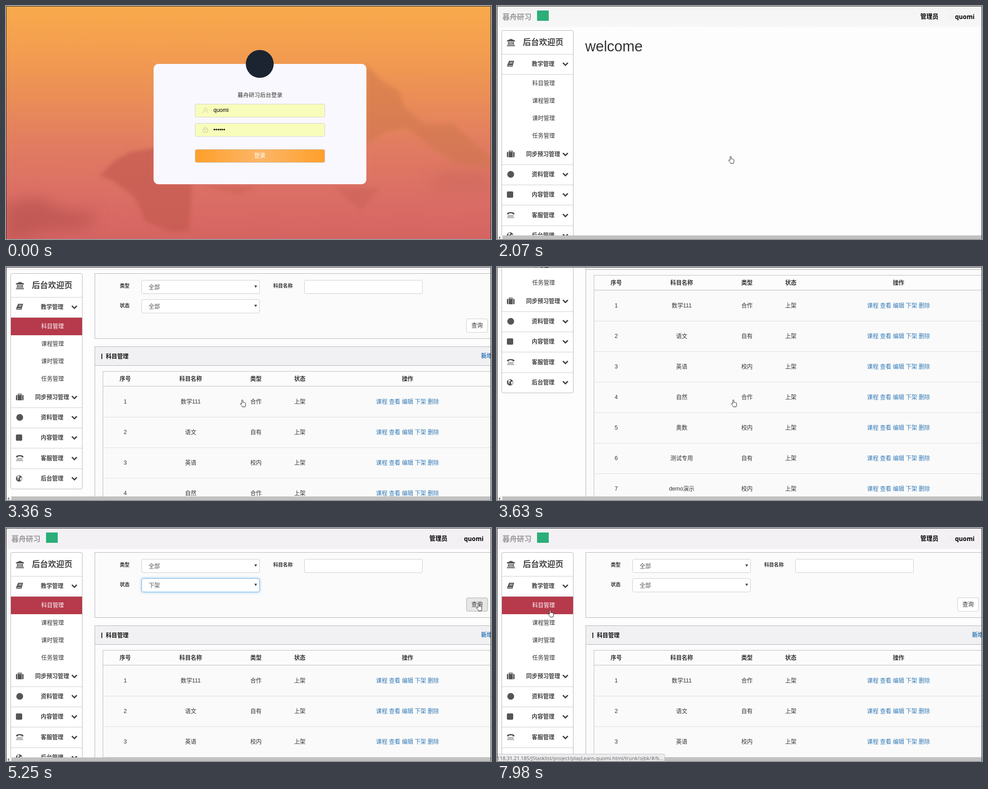
Animation, 1078 px wide and 519 px high, one loop 8000 ms. Source, as an HTML page:

```html
<!DOCTYPE html>
<html lang="zh-CN">
<head>
<meta charset="utf-8">
<title>后台管理</title>
<style>
  html, body { margin: 0; width: 100%; height: 100%; overflow: hidden; background: #fff; }
  body { font-family: "Liberation Sans", "Noto Sans CJK SC", "Noto Sans CJK", sans-serif; color: #333; }
  div, svg { position: absolute; box-sizing: border-box; }
  svg { overflow: visible; }
  #stage { left: 0; top: 0; width: 1078px; height: 519px; overflow: hidden; background: #fdfdfd; }
  .full { left: 0; top: 0; width: 1078px; height: 519px; overflow: hidden; }
  .text { white-space: pre; line-height: 20px; height: 20px; }
  .mid { transform: translateX(-50%); }
  .bold { font-weight: 700; }
  .link { color: #337ab7; }
  .field { border: 1px solid #ccc; border-radius: 4px; background: #fff; }
  .login-field { border: 1px solid #d2d2cf; border-radius: 4px; background: #f9fdbb; }
  .panel { border: 1px solid #b4b4b4; background: #fbfbfb; }
  .focus { border-color: #66afe9; box-shadow: 0 0 6px rgba(102, 175, 233, .6); }
  .submit { border: 1px solid #c9c2b8; border-radius: 4px;
            background: linear-gradient(90deg, #ff9f2a, #fbb668 50%, #ff9f2a); }
  .submit.hover { background: linear-gradient(90deg, #ff9f2a, #f1ad5c 50%, #ff9f2a); }
  .submit.pressed { border: 2px solid #6a9fe6; border-radius: 2px; }
  .query.hover { background: #e6e6e6; border-color: #adadad; }
  .sub { background: #fff; color: #333; }
  .sub.on { background: #b63a4b; color: #fff; }
  .option { background: #fff; color: #555; }
  .option.on { background: #1e90ff; color: #fff; }
</style>
</head>
<body>
<div id="stage"></div>
<script>
const LOOP = 8000;
const BRAND = "暮舟研习", USER = "quomi";
const stage = document.getElementById("stage");

function box(parent, x, y, w, h, css = "", cls = "") {
  const el = document.createElement("div");
  el.className = cls;
  el.style.cssText = `left:${x}px;top:${y}px;width:${w}px;height:${h}px;${css}`;
  return parent.appendChild(el);
}

// y is the vertical middle of the line
function text(parent, str, x, y, size = 12.6, cls = "", css = "") {
  const el = document.createElement("div");
  el.className = "text " + cls;
  el.textContent = str;
  el.style.cssText = `left:${x}px;top:${y - 10}px;font-size:${size}px;${css}`;
  return parent.appendChild(el);
}

function svg(parent, x, y, w, h, body, css = "") {
  parent.insertAdjacentHTML("beforeend",
    `<svg width="${w}" height="${h}" style="left:${x}px;top:${y}px;${css}">${body}</svg>`);
  return parent.lastElementChild;
}

function layer(parent) {
  return box(parent, 0, 0, 1078, 519, "", "full");
}

const person = c => `<g fill="none" stroke="${c}"><circle cx="6.5" cy="4" r="3.3"/>
  <path d="M.5 12.5Q1.5 8 5 7.2M8 7.2Q11.5 8 12.5 12.5"/></g>`;

// Application page
const view = box(stage, 0, 0, 1078, 511, "overflow:hidden");
const app = box(view, 0, 0, 1078, 1200);
const header = box(app, 0, 0, 1078, 47);
text(app, BRAND, 12, 24, 16.2, "bold", "color:#999");
box(app, 89, 10, 26, 23, "background:#2bae78");
text(app, "管理员", 941, 24, 13.4, "bold", "color:#000");
svg(app, 1004, 18, 13, 13, person("#ebe8eb"));
text(app, USER, 1018, 24, 13.6, "bold", 'color:#000;font-family:"Noto Sans",sans-serif');

const icons = [
  '<path d="M0 4L9 0L18 4V6H0zM2.5 7h2.5v5H2.5zM6 7h2.2v5H6zM9.8 7H12v5H9.8zM13 7h2.5v5H13zM1 12.8h16v1.4H1zM0 15h18v1.6H0z"/>',
  '<path d="M5 1H16L12.5 14H2Q-.5 13 1 10z"/><path d="M6.5 4h6.5M5.8 6.5h6.5M2.5 11.5h9" stroke="#fff"/>',
  '<path d="M5 3V1h7v2" fill="none" stroke="#555" stroke-width="1.6"/><rect y="3" width="17" height="12" rx="2"/><path d="M3.5 3v12M13.5 3v12" stroke="#fff"/>',
  '<circle cx="8.5" cy="8" r="7.6"/>',
  '<rect x="0" y="1" width="14" height="14" rx="2.5"/>',
  '<path d="M0 6Q0 1 8.5 1T17 6H12.5V4.2Q8.5 3.2 4.5 4.2V6z"/><path d="M3 8.5h11.5M2 11h13M1 13.5h15" stroke="#555" stroke-width="1.7" stroke-dasharray="2 1.2"/>',
  '<circle cx="7" cy="8" r="7"/><path d="M3 3l4-1 1 3-3 2 1 3-2 1zM9 7l4-1 0 4-3 3z" fill="#fff"/>'
];
const side = box(app, 10, 54, 160, 481,
  "border:1px solid #b4b4b4;border-radius:4px;background:#fff;overflow:hidden");
const menu = [
  ["后台欢迎页", 81, 107], ["教学管理", 129, 152], ["同步预习管理", 330, 353], ["资料管理", 375, 398],
  ["内容管理", 420, 443], ["客服管理", 466, 489], ["后台管理", 511, 0]
];
menu.forEach(([name, y, line], i) => {
  svg(app, 22, y - 8, 18, 17, icons[i], "fill:#555");
  text(app, name, 102.5, y, i ? 12.6 : 18, "bold mid", "color:#444");
  if (i) svg(app, 145, y - 4, 14, 9,
    '<path d="M1.5 1.5L7 7L12.5 1.5" fill="none" stroke="#444" stroke-width="3"/>');
  if (line) box(app, 11, line, 158, 1, "background:#ccc");
});
const subs = ["科目管理", "课程管理", "课时管理", "任务管理"].map((name, i) => {
  const el = box(app, 11, 153 + 39 * i, 158, 39, "", "sub");
  text(el, name, 92.5, 18.5, 12.6, "mid");
  return el;
});

const welcome = layer(app);
welcome.style.left = "171px";
text(welcome, "welcome", 25, 90, 32.4);

// Subject page
const subject = box(app, 0, 0, 1100, 1200);
box(subject, 197, 54, 960, 146, "", "panel");
const label = (s, x, y) => text(subject, s, x, y, 10.8, "bold");
label("类型", 253, 82);
label("科目名称", 594, 82);
label("状态", 253, 126);

function select(y) {
  const el = box(subject, 301, y, 263, 31, "", "field");
  svg(el, 250, 11, 6, 6, '<path d="M0 0H6L3 5.5z" fill="#444"/>');
  const value = text(el, "全部", 15, 15, 12.6, "", "color:#555");
  return { el, value };
}
select(68.5);
const status = select(112);
box(subject, 663, 68.5, 263, 31, "", "field");
const query = box(subject, 1023, 155, 48, 31, "", "field query");
text(query, "查询", 23, 14, 12.6, "mid");

const listPanel = box(subject, 197, 217, 960, 900, "", "panel");
box(listPanel, 0, 0, 960, 42, "background:#f1f0f2;border-bottom:1px solid #b4b4b4");
box(subject, 212, 233, 2, 12, "background:#222");
text(subject, "科目管理", 222, 239, 12.6, "bold", "color:#111");
text(subject, "新增", 1056, 238, 12.6, "bold link");

function table(cols, rows, move) {
  const el = box(subject, 0, 0, 1100, 1200);
  box(el, 215, 272, 940, 35 + 68 * rows.length, "border:1px solid #bbb;background:#fafafa");
  box(el, 215, 272, 940, 34, "border:1px solid #bbb;background:#fcfcfc");
  ["序号", "科目名称", "类型", "状态", "操作"].forEach((s, i) => text(el, s, cols[i], 289, 12.6, "bold mid"));
  rows.forEach(([name, kind], r) => {
    const y = 340 + 68 * r;
    if (r) box(el, 216, y - 34, 938, 1, "background:#ddd");
    [r + 1, name, kind, move === "下架" ? "上架" : "下架"]
      .forEach((s, i) => text(el, s, cols[i], y, 12.6, "mid"));
    text(el, `课程 查看 编辑 ${move} 删除`, cols[4], y, 12.6, "mid link");
  });
  return el;
}
const fullTable = table([265, 410.5, 555.5, 653, 892.5], [
  ["数学111", "合作"], ["语文", "自有"], ["英语", "校内"], ["自然", "合作"],
  ["奥数", "校内"], ["测试专用", "自有"], ["demo演示", "校内"], ["科学", "自有"]
], "下架");
const foundTable = table([266.5, 405.5, 544, 643.5, 888], [["111111111", "校内"]], "上架");
box(foundTable, 804, 410, 267, 31, "border:1px solid #ddd;border-radius:4px;background:#fff");
[["第一页", 804, 59], ["上一页", 863, 59], ["1", 922, 30], ["下一页", 952, 59], ["最后页", 1011, 60]]
  .forEach(([s, x, w], i) => {
    const here = i === 2;
    if (i) box(foundTable, x, 410, 1, 31, "background:#ddd");
    if (here) box(foundTable, x, 410, w, 31, "background:#337ab7");
    text(foundTable, s, x + w / 2, 425, 12.6, "mid", `color:${here ? "#fff" : "#777"}`);
  });

const dropdown = box(subject, 301, 142, 263, 50, "border:1px solid #8ab;background:#fff");
const options = ["全部", "上架", "下架"].map((s, i) => {
  const el = box(dropdown, 0, 16 * i, 261, 16, "", "option");
  text(el, s, 15, 8, 12.6);
  return el;
});

// Browser chrome
const scrollbar = box(stage, 0, 511, 1078, 8, "background:#f1f1f1");
box(scrollbar, 12, 0, 1066, 8, "background:#c1c1c1");
svg(scrollbar, 3, 2, 4, 6, '<path d="M4 0V6L0 3z" fill="#777"/>');
const linkBar = box(stage, -2, 503, 375, 18,
  "background:#ececee;border:1px solid #c2c2c4;border-radius:0 3px 0 0");
text(linkBar, `118.31.21.185/JStasklist/project/playLearn-${USER}-html/trunk/ojbk/#/b...`, 1, 9, 11, "",
  'color:#666;font-family:"Noto Sans",sans-serif');

// Login page
const login = layer(stage);
svg(login, 0, 0, 1078, 519, `
  <defs>
    <linearGradient id="sky" x2="0" y2="1">
      <stop stop-color="#f9aa4b"/><stop offset=".2" stop-color="#f39d50"/>
      <stop offset=".4" stop-color="#ea8d57"/><stop offset=".6" stop-color="#e17c61"/>
      <stop offset=".8" stop-color="#db6f65"/><stop offset="1" stop-color="#d56462"/>
    </linearGradient>
    <filter id="soft" x="-20%" y="-30%" width="140%" height="160%"><feGaussianBlur stdDeviation="5"/></filter>
    <filter id="haze" x="-30%" y="-50%" width="160%" height="200%"><feGaussianBlur stdDeviation="16"/></filter>
  </defs>
  <rect width="1078" height="519" fill="url(#sky)"/>
  <path d="M208 378L240 345L275 326L335 316V395H414L406 502L370 505L310 480L285 425L235 388z" fill="#c65c51" opacity=".75" filter="url(#soft)"/>
  <path d="M0 440L70 428L130 455L205 462L180 495L90 500L0 530z" fill="#b95250" opacity=".7" filter="url(#haze)"/>
  <path d="M800 130L840 170L872 188L888 228L932 263L992 262L1078 338V362L1000 350L940 310L890 272L845 280L800 308z" fill="#cc764b" opacity=".5" filter="url(#soft)"/>
  <path d="M930 385L1000 365L1078 375V415L960 412z" fill="#c9655a" opacity=".45" filter="url(#haze)"/>
  <path d="M430 400H560L520 420zM730 405H830L790 455z" fill="#c86057" opacity=".5" filter="url(#soft)"/>`);
box(login, 328, 129, 473, 268, "background:#f9f8fe;border-radius:11px");
box(login, 533, 98, 62, 62, "background:#1b2430;border-radius:50%");
text(login, BRAND + "后台登录", 564.5, 199, 12.5, "mid");
[218, 261].forEach(y => box(login, 420, y, 289, 30, "", "login-field"));
svg(login, 437, 226, 13, 13, person("#c9cba5"));
svg(login, 437, 269, 13, 13, `<g fill="none" stroke="#bfc1a0"><rect x="1" y="5" width="10.5" height="7.5" rx="1"/>
  <path d="M3 5V3.5Q3 .7 6.2 .7T9.4 3.5V5M6.2 7v3.5M5 8h2.5"/></g>`);
text(login, USER, 461, 232, 12.4, "", "color:#000");
text(login, "••••••", 461, 276, 12.4, "", "color:#000");
const submit = box(login, 420, 319, 289, 30, "", "submit");
text(login, "登录", 564, 333, 12.6, "mid", "color:#fff");

box(stage, 0, 0, 1078, 530, "border:1px solid #222");
const hand = svg(stage, 0, 0, 13, 17, `<path d="M4 10V2.2a1.3 1.3 0 0 1 2.6 0V7c.3-.9 2-.8 2.3.2.5-.7 1.9-.4 2 .5.6-.5 1.7-.1 1.7.9V12c0 1.5-.9 2.3-1 4.5H5.3C5 14.6 2.8 12.8.9 10.4c-.7-1 .5-2 1.5-1.3z"
  fill="#fff" stroke="#222"/>`);

// Tables of [ms, values...]; values are linear in between
const cursorPath = [
  [330, 1071, 38], [420, 830, 205], [510, 585, 326], [570, 542.5, 343.5],
  [1980, 542.5, 343.5], [2100, 513, 342], [2190, 473, 338], [2280, 407, 322], [2340, 301, 295],
  [2400, 214, 255], [2490, 163, 233], [2550, 150, 220], [2610, 117, 187],
  [2880, 117, 187], [3270, 526, 303], [3840, 526, 303], [4200, 490, 132],
  [4260, 490, 132], [4560, 455, 184], [4770, 455, 184], [5220, 1051, 176],
  [5760, 1051, 176], [5850, 981, 179], [6180, 738, 382], [6300, 763, 399],
  [6810, 763, 399], [7560, 115, 187], [7830, 115, 187], [7890, 114.5, 183.5], [7980, 119, 190]
];
const scrollPath = [[3310, 0], [3630, 254], [3780, 254], [4110, 0]];

function at(path, t) {
  const i = path.findIndex(k => k[0] > t);
  if (i === 0) return path[0].slice(1);
  if (i < 0) return path[path.length - 1].slice(1);
  const a = path[i - 1], b = path[i], p = (t - a[0]) / (b[0] - a[0]);
  return a.slice(1).map((v, k) => v + (b[k + 1] - v) * p);
}

const show = (el, on) => { el.style.display = on ? "" : "none"; };
const within = (t, from, to) => t >= from && t < to;

function render(t) {
  const [x, y] = at(cursorPath, t), [scroll] = at(scrollPath, t);
  const tip = y - 7;
  const onSubject = t >= 2820, filtered = within(t, 5760, 7620);

  show(hand, t >= 330);
  hand.style.transform = `translate(${Math.round(x - 6.5)}px,${Math.round(y - 8.5)}px)`;
  show(login, t < 1860);
  submit.classList.toggle("hover", t >= 510);
  submit.classList.toggle("pressed", t >= 1830);

  app.style.transform = `translateY(${-Math.round(scroll)}px)`;
  header.style.background = onSubject ? "#f4f1f5" : "linear-gradient(#f4f4f4,#f7f7f7)";
  show(welcome, !onSubject);
  show(subject, onSubject);
  subs.forEach((el, i) => {
    const top = 153 + 39 * i - scroll;
    const hover = x > 11 && x < 169 && tip >= top && tip < top + 39;
    el.classList.toggle("on", hover || (onSubject && i === 0));
  });

  show(fullTable, !filtered);
  show(foundTable, filtered);
  listPanel.style.height = filtered ? "247px" : "900px";
  status.value.textContent = within(t, 4770, 7620) ? "下架" : "全部";
  status.el.classList.toggle("focus", within(t, 4260, 5760));
  query.classList.toggle("hover", x > 1023 && x < 1071 && within(tip, 155, 186));

  show(dropdown, within(t, 4260, 4770));
  const picked = Math.max(0, Math.min(2, Math.floor((tip - 143) / 16)));
  options.forEach((el, i) => el.classList.toggle("on", i === picked));
  show(linkBar, within(t, 2790, 3000) || t >= 7530);
}

const start = performance.now();
function tick() {
  render((performance.now() - start) % LOOP);
  requestAnimationFrame(tick);
}
tick();
</script>
</body>
</html>
```
